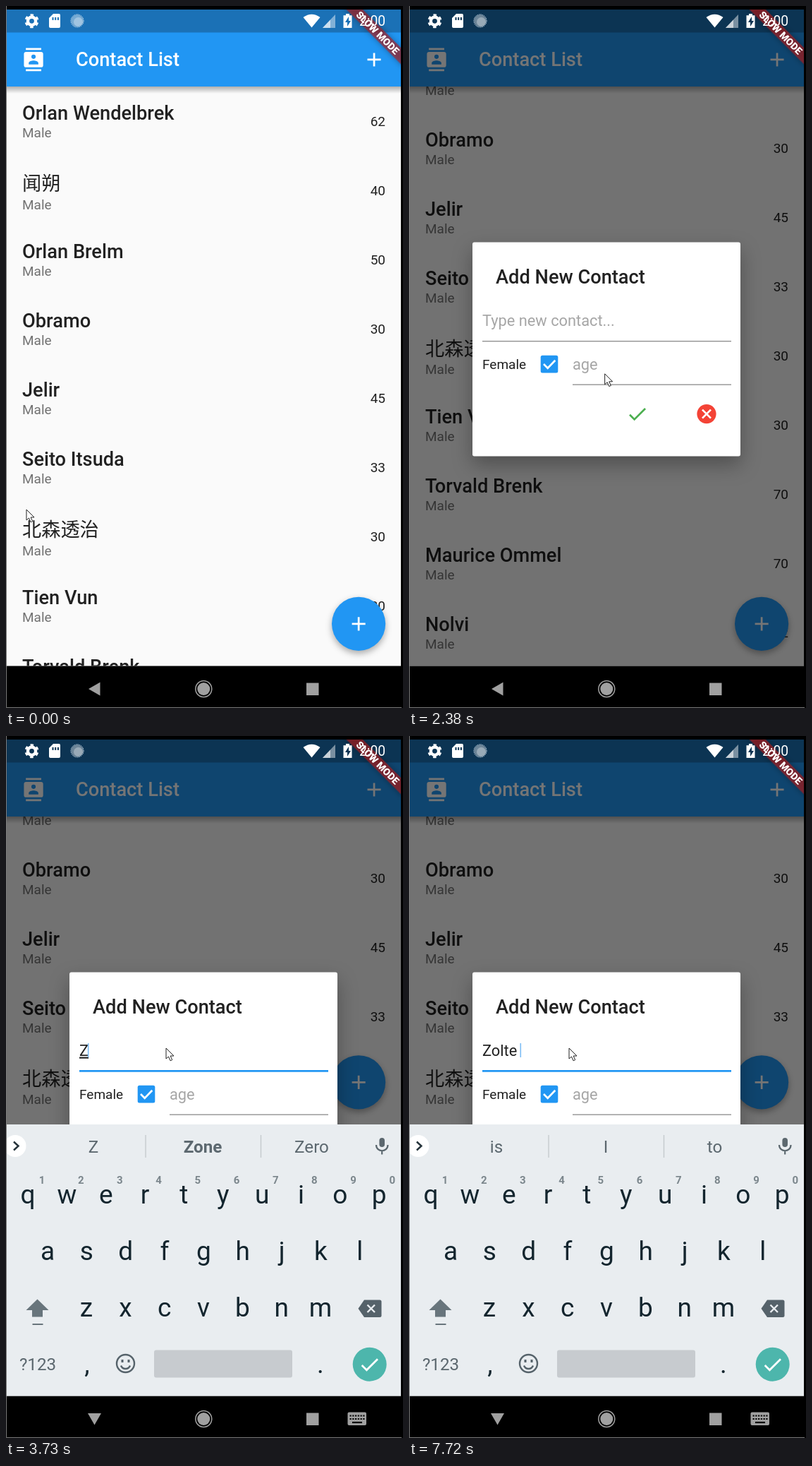
Recreate the animation shown at these times as an HTML page. Size 563 by 994 pixels, loop 8000 ms.

```html
<!DOCTYPE html>
<html lang="en">
<head>
<meta charset="utf-8">
<title>Contact List</title>
<style>
  html, body { margin: 0; width: 100%; height: 100%; overflow: hidden; background: #000; }
  svg { display: block; width: 563px; height: 994px; }
  text { font-family: Roboto, "Noto Sans CJK SC", "Noto Sans CJK JP", sans-serif; white-space: pre; }
  .title { font-size: 27.2px; font-weight: 500; fill: #212121; }
  .cjk { font-weight: 400; }
  .small { font-size: 19px; fill: #212121; }
  .sub { fill: #717171; }
  .field { font-size: 21.8px; fill: #212121; }
  .hint { fill: #a6a6a6; }
  .mid { text-anchor: middle; }
  .end { text-anchor: end; }
  .white { fill: #fff; }
  .key { font-size: 37px; fill: #13252e; text-anchor: middle; }
  .digit { font-size: 15px; font-weight: 700; fill: #7b868c; text-anchor: middle; }
  .strip { font-size: 24.2px; fill: #5c686f; text-anchor: middle; }
  #fab { filter: drop-shadow(0 4px 5px rgba(0,0,0,.32)); }
  #dialog rect:first-child { filter: drop-shadow(0 12px 14px rgba(0,0,0,.3)); }
</style>
</head>
<body>
<svg viewBox="0 0 563 994">
  <defs>
    <clipPath id="screen"><rect x="1" y="5" width="559" height="929.5"/></clipPath>
    <clipPath id="stage"><rect x="1" y="5" width="559" height="988"/></clipPath>
    <clipPath id="body"><rect id="bodyBox" x="1" y="113" width="560" height="822"/></clipPath>
    <linearGradient id="shade" x2="0" y2="1">
      <stop stop-color="#000" stop-opacity=".3"/><stop offset="1" stop-color="#000" stop-opacity="0"/>
    </linearGradient>
    <path id="plus" d="M19 13h-6v6h-2v-6H5v-2h6V5h2v6h6v2z"/>
    <path id="tick" d="M9 16.17L4.83 12l-1.42 1.41L9 19 21 7l-1.41-1.41z"/>
  </defs>

  <rect width="563" height="994"/>
  <path d="M.5 0V993.5H561" fill="none" stroke="#7a7a7a"/>

  <g clip-path="url(#screen)">
    <rect x="1" y="5" width="560" height="930" fill="#fafafa"/>
    <g clip-path="url(#body)"><g id="list"></g></g>
    <g id="fab">
      <circle cx="500.1" cy="874.8" r="38.1" fill="#2196f3"/>
      <circle id="splash" cx="500.1" cy="874.8" fill="#fff"/>
      <use href="#plus" class="white" transform="translate(483.8 858.5) scale(1.3625)"/>
    </g>
    <rect x="1" y="114" width="560" height="10" fill="url(#shade)"/>
    <rect x="1" y="37" width="560" height="77" fill="#2196f3"/>
    <rect x="1" y="5" width="560" height="32.5" fill="#1b71b6"/>
    <path class="white" fill-rule="evenodd" transform="translate(22.7 59.6) scale(1.3625)" d="M20 0H4v2h16V0zM4 24h16v-2H4v2zM20 4H4c-1.1 0-2 .9-2 2v12c0 1.1.9 2 2 2h16c1.1 0 2-.9 2-2V6c0-1.1-.9-2-2-2zm-8 2.75a2.25 2.25 0 1 1 0 4.5 2.25 2.25 0 1 1 0-4.5zM17 17H7v-1.5c0-1.67 3.33-2.5 5-2.5s5 .83 5 2.5V17z"/>
    <text x="99" y="85" class="title white">Contact List</text>
    <use href="#plus" class="white" transform="translate(505.7 59.6) scale(1.3625)"/>

    <rect id="scrim" x="1" y="5" width="560" height="930" fill-opacity=".54"/>
    <g id="dialog">
      <rect x="90" y="334.5" width="380" height="303" rx="2.7" fill="#fff"/>
      <text x="123" y="393" class="title">Add New Contact</text>
      <text x="104" y="452.5" class="field hint" id="hint">Type new contact...</text>
      <text x="104" y="452.5" class="field" id="typed"></text>
      <rect id="caret" y="435" width="1.6" height="20" fill="#7dbdf5"/>
      <rect id="line" x="104" width="353"/>
      <text x="104" y="514" class="small">Female</text>
      <rect x="186.7" y="494.8" width="24.6" height="24.6" rx="2.5" fill="#2196f3"/>
      <path d="M191 507l5.7 5.8 10.6-11" fill="none" stroke="#fff" stroke-width="2.7"/>
      <text x="232" y="514.5" class="field hint">age</text>
      <rect x="232" y="535.5" width="225" height="1.3" fill="#8c8c8c"/>
      <use href="#tick" fill="#4caf50" transform="translate(307.4 561.4) scale(1.3625)"/>
      <circle cx="422" cy="577.6" r="13.6" fill="#f44336"/>
      <path d="M416 571.6l12 12m0-12l-12 12" stroke="#fff" stroke-width="2.7"/>
    </g>

    <g transform="translate(560 5) rotate(45)">
      <rect x="-60" y="38.2" width="120" height="16.4" fill="#b71c1c" fill-opacity=".63" style="filter:drop-shadow(0 0 4px rgba(0,0,0,.5))"/>
      <text y="51.4" class="mid white" font-size="13.9" font-weight="900">SLOW MODE</text>
    </g>
    <g class="white">
      <g fill="none" stroke="#fff">
        <circle cx="36.5" cy="21.3" r="5.6" stroke-width="4.4"/>
        <circle cx="36.5" cy="21.3" r="8.4" stroke-width="3.2" stroke-dasharray="4.4" stroke-dashoffset="-2.2"/>
      </g>
      <path fill-rule="evenodd" d="M67 11h8q2 0 2 2v16q0 2-2 2H63q-2 0-2-2V17zM65.5 16v4h2v-4zm3.7 0v4h2v-4zm3.7 0v4h2v-4z"/>
      <circle cx="101" cy="21" r="8.5" fill-opacity=".4"/>
      <circle cx="102.500" cy="22.500" r="6.500" fill-opacity=".3"/>
      <circle cx="101" cy="21" r="9" fill="none" stroke="#d5e7f5" stroke-dasharray="1.5 1"/>
      <path d="M421.5 16Q433.5 7.5 445.5 16L433.5 30.5z"/>
      <path d="M467 12v19h-18z" fill-opacity=".45"/>
      <path d="M460 19.400V31h-11z" fill-opacity=".6"/>
      <path fill-rule="evenodd" d="M482 11h5v2.2h3.5V31h-12V13.2h3.500zM486 15l-5 8h3v6l5-8h-3z"/>
      <text x="501" y="28" class="white" font-size="19.3">2:00</text>
    </g>
  </g>

  <g clip-path="url(#stage)">
    <g id="keyboard">
      <rect x="1" y="550" width="560" height="384.5" fill="#e9edf0"/>
      <circle cx="13" cy="580.5" r="15.5" class="white"/>
      <path d="M11 574.5l6.5 6-6.5 6" fill="none" stroke="#26343b" stroke-width="2.5"/>
      <path d="M198 565v32M361.5 565v32" stroke="#c3c8cb" stroke-width="1.3"/>
      <text class="strip" x="124" y="589.5"></text>
      <text class="strip" x="279" y="589.5"></text>
      <text class="strip" x="433.5" y="589.5"></text>
      <g stroke="#5c686f" stroke-width="2.2" fill="none">
        <rect x="530.5" y="570" width="5.4" height="11" rx="2.7" fill="#5c686f"/>
        <path d="M525 579c0 11 16.5 11 16.5 0M533.2 587v5.5"/>
      </g>
      <g id="keys"></g>
      <g id="shift"><path d="M44.5 797.5l16 15.5h-8.5v9.5h-15V813h-8.5z"/><path d="M37.5 832h15v2h-15z"/></g>
      <path d="M508 798.5h22q2.5 0 2.5 2.5v19.5q0 2.5-2.5 2.5h-22l-8.5-12.2z" fill="#55626a"/>
      <path d="M512.5 805.5l10.5 10.5m0-10.5l-10.5 10.5" stroke="#e9edf0" stroke-width="2.4"/>
      <text x="45" y="897.5" class="strip">?123</text>
      <text x="115" y="902" class="key">,</text>
      <text x="446" y="902" class="key">.</text>
      <g fill="none" stroke="#55626a" stroke-width="2.4">
        <circle cx="169.5" cy="888.5" r="12.5"/>
        <path d="M163 891.5c2.5 6 10.5 6 13 0"/>
        <path d="M165 883v4m9-4v4" stroke-width="3"/>
      </g>
      <rect x="210" y="869.5" width="196" height="39" rx="3" fill="#c7cbcf"/>
      <circle cx="515.7" cy="889.7" r="24" fill="#4db6ac"/>
      <use href="#tick" class="white" transform="translate(499 873.5) scale(1.38)"/>
    </g>
    <g fill="#a0a0a0">
      <path id="back" d="M117 967l16.5-9.5v19z"/>
      <circle cx="280.3" cy="967" r="9"/>
      <circle cx="280.3" cy="967" r="11.5" fill="none" stroke="#a0a0a0" stroke-width="1.5"/>
      <rect x="426" y="958.5" width="17.5" height="17.5"/>
      <g id="switcher">
        <rect x="484.5" y="957.5" width="26.5" height="18.5" rx="2"/>
        <path d="M487.5 962.5h21m-21 4.5h21" stroke="#000" stroke-width="2.2" stroke-dasharray="2.2 1.56"/>
        <path d="M491 972h14" stroke="#000" stroke-width="2.2"/>
      </g>
    </g>
  </g>
  <path id="mouse" d="M0 0v15l3.5-3 2.6 5.8 2.6-1.2-2.6-5.6h4.9z" fill="#fff" stroke="#222"/>
</svg>

<script>
const $ = id => document.getElementById(id);
const put = (id, name, value) => $(id).setAttribute(name, value);
const clamp = (v, lo = 0, hi = 1) => Math.min(hi, Math.max(lo, v));
const part = (t, from, to) => clamp((t - from) / (to - from));
const ease = q => (1 - Math.cos(Math.PI * q)) / 2;

const contacts = [
  ['Orlan Wendelbrek', 62], ['闻朔', 40], ['Orlan Brelm', 50], ['Obramo', 30],
  ['Jelir', 45], ['Seito Itsuda', 33], ['北森透治', 30], ['Tien Vun', 30],
  ['Torvald Brenk', 70], ['Maurice Ommel', 70], ['Nolvi', 62]
];
$('list').innerHTML = contacts.map(([name, age], i) => {
  const y = 98 * i, cjk = name.charCodeAt(0) > 255;
  return `<text x="23" y="${y + (cjk ? 163 : 161)}" class="title ${cjk ? 'cjk' : ''}">${name}</text>
    <text x="23" y="${y + (cjk ? 189.5 : 186)}" class="small sub">Male</text>
    <text x="538" y="${y + 170}" class="small end">${age}</text>`;
}).join('');

const keyRows = [['qwertyuiop', 31], ['asdfghjkl', 59], ['zxcvbnm', 114]];
$('keys').innerHTML = keyRows.map(([letters, x], row) => [...letters].map((c, i) =>
  `<text class="key letter" x="${x + 55.35 * i}" y="${662 + 80 * row}">${c}</text>` +
  (row ? '' : `<text class="digit" x="${51 + 55.2 * i}" y="634">${(i + 1) % 10}</text>`)
).join('')).join('');
const letters = [...document.querySelectorAll('.letter')];
const digits = [...document.querySelectorAll('.digit')];
const strip = [...document.querySelectorAll('.strip')].slice(0, 3);

// time, x, y, sideways bend of the path leading away
const path = [
  [30, 29, 713, 38], [819, 206, 284, 0], [860, 206, 284, 0], [1270, 515, 905, 0],
  [1470, 502, 871, 0], [1620, 502, 871, 0], [1650, 495, 859, 0],
  [1860, 495, 859, 0], [2590, 227, 442, 0]
];
function mouseAt(t) {
  const next = path.findIndex(p => p[0] > t);
  const i = next < 0 ? path.length - 2 : Math.max(0, next - 1);
  const [a, b] = [path[i], path[i + 1]];
  const f = ease(part(t, a[0], b[0]));
  return [a[1] + (b[1] - a[1]) * f + a[3] * Math.sin(Math.PI * f), a[2] + (b[2] - a[2]) * f];
}

const typing = [
  [0, ''], [3480, 'Z'], [3910, 'Zo'], [4090, 'Zol'], [4180, 'Zolt'], [4710, 'Zolte'], [4770, 'Zoltes'],
  [5660, 'Zolte'], [5780, 'Zolt'], [5910, 'Zol'], [6030, 'Zo'],
  [6640, 'Zol'], [6730, 'Zolt'], [6880, 'Zolte'], [7660, 'Zolte ']
];
const suggestions = {
  '': 'Thanks I We', Z: 'Z Zone Zero', Zo: 'Zo Zone Zoo', Zol: 'Zol Sol Zoo',
  Zolt: 'Zolt Bolt Volt', Zolte: 'Zolte Bolts Bolster', Zoltes: 'Zoltes Bolts Bolsters',
  'Zolte ': 'is I to'
};
const blinks = [[0, 2710], [3230, 3480], [5170, 5660], [7160, 7660]];

let shownText, shownCase;
function showText(text) {
  if (text === shownText) return;
  shownText = text;
  const composing = text && !text.endsWith(' ');
  $('typed').textContent = text;
  $('typed').style.textDecoration = composing ? 'underline 1px' : 'none';
  put('hint', 'opacity', text ? 0 : 1);
  suggestions[text].split(' ').forEach((word, i) => strip[i].textContent = word);
  strip[1].style.fontWeight = composing ? 700 : 400;
}
function showCase(upper) {
  if (upper === shownCase) return;
  shownCase = upper;
  letters.forEach(e => e.textContent = upper ? e.textContent.toUpperCase() : e.textContent.toLowerCase());
  put('keys', 'transform', `translate(0 ${upper ? 3 : 0})`);
  digits.forEach(e => e.setAttribute('y', upper ? 631 : 634));
  put('shift', 'fill', upper ? '#4db6ac' : '#68757c');
}

function draw(t) {
  const [mx, my] = mouseAt(t);
  put('mouse', 'transform', `translate(${mx} ${my})`);
  const scroll = t < 810 ? clamp(595 - my, 0, 256.5) : 256.5;
  put('list', 'transform', `translate(0 ${-scroll})`);

  const raised = t >= 2750;
  put('fab', 'transform', `translate(0 ${raised ? -384.5 : 0})`);
  put('bodyBox', 'height', raised ? 437 : 822);
  put('back', 'transform', raised ? 'rotate(-90 125.5 967)' : '');
  put('switcher', 'opacity', raised ? 1 : 0);
  put('splash', 'r', 38.1 * part(t, 1800, 2000));
  put('splash', 'opacity', .12 * part(t, 1790, 1850) * (1 - part(t, 1900, 2250)));

  const open = part(t, 2110, 2290);
  put('scrim', 'opacity', open);
  put('dialog', 'opacity', open);
  const focused = t >= 2710;
  put('line', 'y', focused ? 473 : 474);
  put('line', 'height', focused ? 2.7 : 1.3);
  put('line', 'fill', focused ? '#2196f3' : '#8c8c8c');

  const rest = 1 - part(t, 2860, 3060);
  put('keyboard', 'transform', `translate(0 ${276 * rest ** 3.5})`);
  put('keyboard', 'opacity', 1 - rest ** 2.37);
  showCase(t < 3560);
  showText(typing.filter(e => e[0] <= t).pop()[1]);
  put('caret', 'x', 103.6 + (shownText ? $('typed').getComputedTextLength() - .8 : 0));
  put('caret', 'opacity', blinks.some(([a, b]) => t >= a && t < b) ? 0 : 1);
}

function tick() {
  draw(performance.now() % 8000);
  requestAnimationFrame(tick);
}
tick();
</script>
</body>
</html>
```
